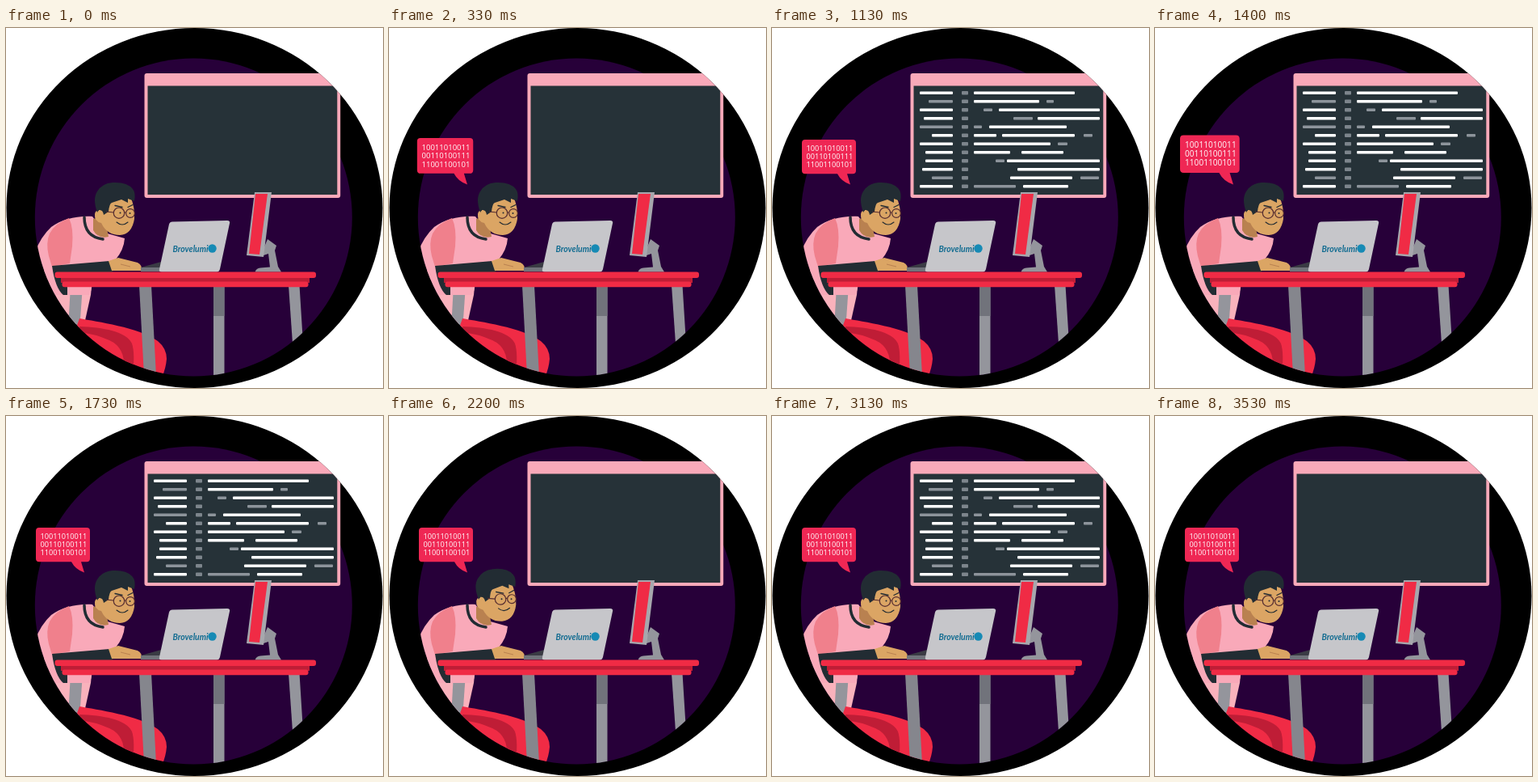
Recreate the animation shown at these times as an HTML page. Size 467 px wide and 445 px high, loop 3.59 s.

```html
<!DOCTYPE html>
<html lang="en">
<head>
<meta charset="utf-8">
<title>Programmer at a desk</title>
<style>
  html, body { margin: 0; width: 100%; height: 100%; overflow: hidden; background: #fff; }
  svg { display: block; width: 467px; height: 445px; }
  .red { fill: #f02b45; }
  .darkRed { fill: #bf1d36; }
  .pink { fill: #f9a9b9; }
  .salmon { fill: #f0808c; }
  .skin { fill: #dba564; }
  .dark { fill: #222c33; }
  .steel { fill: #94959c; }
  .shade { fill: #71737b; }
  .line { fill: none; stroke: #222c33; stroke-linecap: round; }
</style>
</head>
<body>
<svg viewBox="0 0 467 445">
  <defs>
    <clipPath id="outer"><ellipse cx="233.5" cy="222.5" rx="233" ry="222.5"/></clipPath>
    <clipPath id="inner"><circle cx="232.3" cy="234" r="196.5"/></clipPath>
    <clipPath id="reveal"><path id="revealEdge"/></clipPath>
  </defs>

  <g clip-path="url(#outer)">
    <rect width="467" height="445"/>
    <circle cx="232.3" cy="234" r="196.5" fill="#270039"/>

    <!-- Wall display -->
    <rect class="pink" x="171.5" y="56" width="242.7" height="154" rx="3"/>
    <rect x="175.5" y="71.5" width="234.8" height="134.5" fill="#263238"/>
    <g id="code" clip-path="url(#reveal)"/>
  </g>

  <g clip-path="url(#inner)">
    <!-- Trousers and chair -->
    <path fill="#f9b2bc" d="M40 300H108L105 330L97 366H70Z"/>
    <path class="steel" d="M80 318H95L91 374L77 372Z"/>
    <path class="red" d="M91 359C112 363 165 370 188 387Q199 396 199 409Q198 421 193 432H130L85 376Z"/>
    <path class="darkRed" d="M91 369C120 370 149 375 156 390Q160 402 157 428L146 421Q148 395 128 386Q110 378 91 376Z"/>

    <!-- Table legs -->
    <path fill="#85868d" d="M165 318H180L186 430H171Z"/>
    <path class="steel" d="M257 318H270.5V432H257Z"/>
    <path class="shade" d="M257 318H270.5V356H257Z"/>
    <path class="steel" d="M350 318H363.5L368 390H355Z"/>

    <!-- Torso and sleeves -->
    <path class="pink" d="M107 233C86 232 69 237 56 246Q43 258 36 277L61 330H104L110 303L136 286Q146 274 147 260L122 253Z"/>
    <path class="salmon" d="M78 235Q61 241 54 254Q49 266 53 282L57 295L79 291L82 270Q84 247 78 235Z"/>
    <path fill="#b98150" d="M108 236L122 232L127 258Q114 261 108 250Z"/>
    <path class="line" stroke-width="3.5" d="M97 234Q97 258 120 261"/>
    <path class="dark" d="M57 294L128 288L133 302H76V330H71Q61 322 57 294Z"/>
  </g>

  <!-- Head -->
  <g id="head">
    <path class="skin" d="M113 211L154 208Q160 222 159 236Q156 255 141 256Q125 256 118 241Q109 239 110 230Q111 225 115 226Z"/>
    <path class="dark" d="M113 228Q107 211 113 202Q119 192 132 191Q150 190 157 199Q161 204 159 214L151 211L151 216L143 212L131 216Q128 217 127 227L121 231Q120 224 115 225Z"/>
    <g fill="none" stroke="#552c30" stroke-width="1.2">
      <circle cx="140" cy="228.7" r="6.7"/>
      <circle cx="154" cy="229" r="5.4"/>
      <path d="M124 227L133.5 228M146.7 228H148.7"/>
    </g>
    <path class="line" stroke-width="1.3" d="M135 219.5L144 221.5M151 221.5L157 218.5"/>
    <circle class="dark" cx="141.5" cy="228.5" r="1"/>
    <circle class="dark" cx="153.5" cy="229" r="1"/>
    <path class="line" stroke-width="1.1" d="M137 240Q144 246 151 240"/>
  </g>

  <!-- Hands and laptop -->
  <path class="skin" d="M127 288L139 284L151 287L163 290Q169 293 168 300H131Z"/>
  <path fill="none" stroke="#b98150" d="M142 292L154 295"/>
  <path fill="#3a3b44" d="M167 296L192 289V301H167Z"/>
  <path class="shade" d="M167 296H192V301H167Z"/>
  <path fill="#c6c6ca" d="M206 239.5L274 238Q278 238 277 241.5L265 298Q264 301.5 261 301.5H193Q189 301.5 190 298L202 242.5Q203 239.5 206 239.5Z"/>
  <text x="206.5" y="276.5" font-family="Lato, sans-serif" font-size="10.4" font-style="italic" font-weight="700" fill="#126c91">Brovelumi</text>
  <circle cx="255.5" cy="272.5" r="5.2" fill="#168ab5"/>

  <!-- Side monitor -->
  <path class="steel" d="M324 261L335 269L333 275L337 295L341 301.5H308.5Q310 297 315 296.5L327 295.5L325 279L316 282L318 275Z"/>
  <path fill="#a7a7ad" d="M308 203H329L319 283L298 281Z"/>
  <path class="red" d="M309 205H324L314 280L301 279Z"/>

  <!-- Tabletop -->
  <rect class="darkRed" x="68" y="306" width="308" height="9"/>
  <rect class="red" x="60.5" y="301.5" width="323.5" height="7.5" rx="3"/>
  <rect class="red" x="69.5" y="313.5" width="305" height="6.8" rx="3"/>

  <!-- Speech bubble -->
  <g id="bubble">
    <path fill="#ef2754" d="M41 138H100Q104 138 104 142V176.3Q104 180.3 100 180.3H93L97 193.5Q86 190 81 180.3H41Q37 180.3 37 176.3V142Q37 138 41 138Z"/>
    <g font-family="'Noto Sans', sans-serif" font-size="9.2" fill="#fff" fill-opacity=".92">
      <text x="42.5" y="152.2">10011010011</text>
      <text x="42.5" y="162.3">00110100111</text>
      <text x="42.5" y="172.4">11001100101</text>
    </g>
  </g>
</svg>

<script>
const LOOP = 3590;
const BUBBLE_PERIOD = 1200;
const byId = id => document.getElementById(id);
const clamp = v => Math.min(1, Math.max(0, v));
const smooth = v => { v = clamp(v); return v * v * (3 - 2 * v); };

// Each row: dashes as start-end, "g" marks a grey one.
const rows = [
  '183-224 250-375',
  'g194-224 250-331 g340-349',
  '183-224 g262-273 281-406',
  '188-224 g299-323 329-406',
  'g183-224 g250-260 269-365',
  '198-224 250-278 285-375 g386-397',
  '183-224 250-345 g354-366',
  '190-224 250-295 309-361',
  '190-224 g277-288 291-406',
  '186-224 304-406',
  'g198-224 295-372 g382-405',
  '183-224 g250-302 311-367'
];

function dash(x1, x2, y, height, color) {
  return `<rect x="${x1}" y="${y - height / 2}" width="${x2 - x1}" height="${height}" rx="1" fill="${color}"/>`;
}

byId('code').innerHTML = rows.map((row, i) => {
  const y = 80.3 + i * 10.5;
  const dashes = row.split(' ').map(part => {
    const [x1, x2] = part.replace('g', '').split('-').map(Number);
    return dash(x1, x2, y, 3.4, part[0] === 'g' ? '#8d949b' : '#fff');
  });
  return dash(235, 243, y, 4.4, '#7d858c') + dashes.join('');
}).join('');

// Code is uncovered from the bottom up, then cleared at once.
function drawCode(t) {
  const cycleTime = t < 1797 ? t : t - 1733;
  const visible = cycleTime < 1797;
  const progress = visible ? clamp((cycleTime - 580) / 430) : 0;
  const edge = 200 - 129 * progress;
  byId('revealEdge').setAttribute('d', progress
    ? `M176 ${edge}L412 ${edge + 7 * (1 - progress)}V206H176Z` : 'M0 0');
}

function drawBubble(t) {
  const phase = t % BUBBLE_PERIOD;
  const scale = phase < 200
    ? 1.1 * smooth(phase / 200)
    : 1.1 - 0.1 * smooth((phase - 230) / 170);
  byId('bubble').setAttribute('transform',
    `translate(97 194) scale(${scale}) translate(-97 -194)`);
}

function drawHead(t) {
  const lift = smooth((t - 1800) / 350) * (1 - smooth((t - 2300) / 500));
  byId('head').setAttribute('transform',
    `translate(${-lift} ${-1.3 * lift}) rotate(${-2.5 * lift} 118 250)`);
}

function draw(now) {
  const t = now % LOOP;
  drawCode(t);
  drawBubble(t);
  drawHead(t);
}

const start = performance.now();
function frame() {
  draw(performance.now() - start);
  requestAnimationFrame(frame);
}
frame();
</script>
</body>
</html>
```
